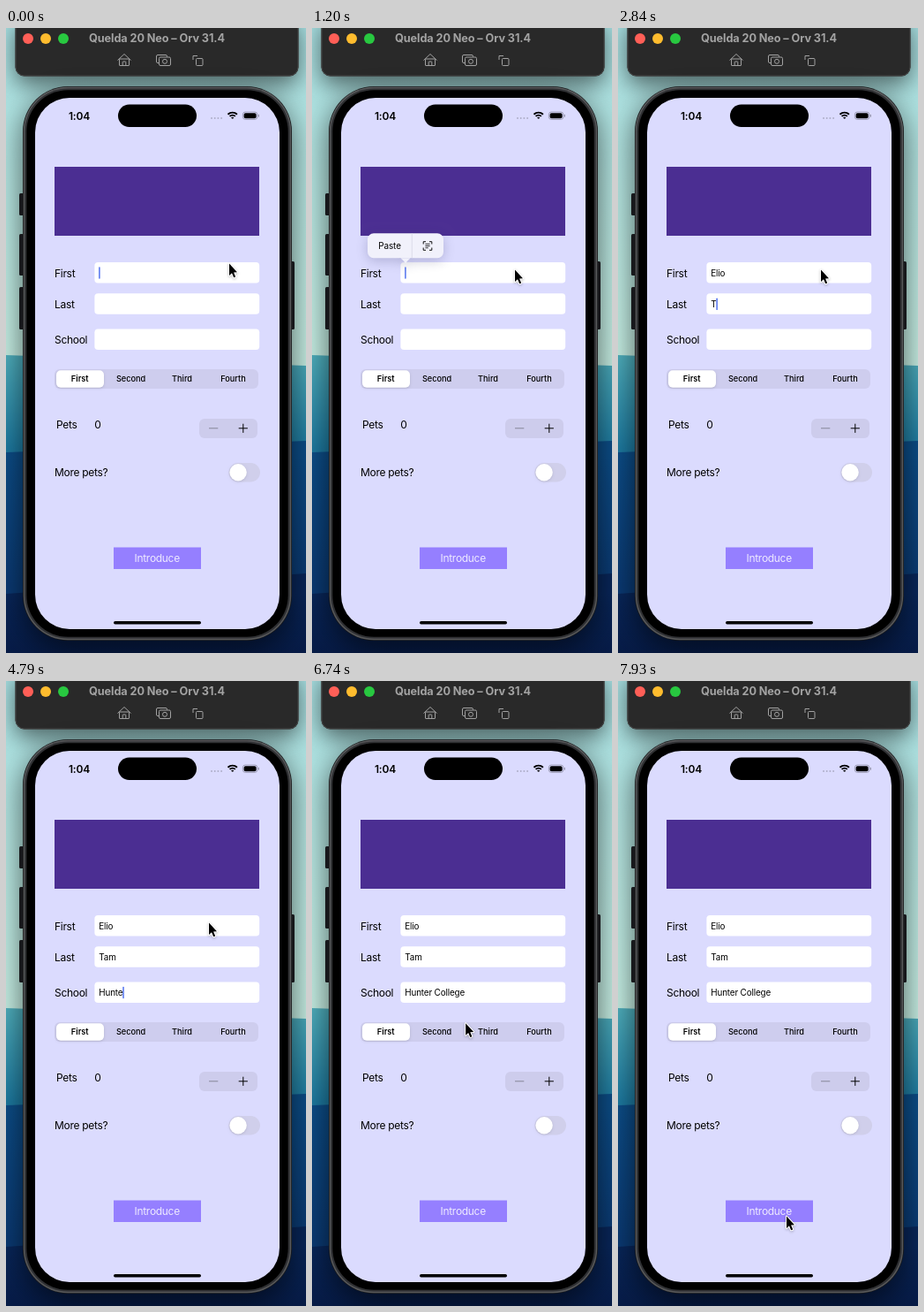
Animation of 340 by 707 pixels, one loop 8000 ms. Source, as an HTML page with a canvas:

```html
<!DOCTYPE html>
<html lang="en">
<head>
<meta charset="utf-8">
<title>Form demo</title>
<style>
  html, body { margin: 0; width: 100%; height: 100%; overflow: hidden; background: #000; }
  canvas { display: block; width: 340px; height: 707px; }
</style>
</head>
<body>
<canvas id="stage"></canvas>
<script>
const W = 340, H = 707, LOOP = 8000;
const FRAME = 149.7;
const PACE = 149.5;    // time per typed letter
const MENU_AT = 1050;

const canvas = document.getElementById('stage');
const ctx = canvas.getContext('2d');
const ratio = window.devicePixelRatio || 1;
canvas.width = W * ratio;
canvas.height = H * ratio;

const fields = [
  { label: 'First', y: 265, value: 'Elio', focusAt: -300, typeAt: 1500 },
  { label: 'Last', y: 300.3, value: 'Tam', focusAt: 2390, typeAt: 2840 },
  { label: 'School', y: 340.5, value: 'Hunter College', focusAt: 3590, typeAt: 4190 }
];
const pointerStops = [
  { t: 0, x: 252, y: 265.5 },
  { t: 450, x: 229, y: 272.5 },
  { t: 6140, x: 229, y: 272.5 },
  { t: 6740, x: 173, y: 386.5 },
  { t: 7480, x: 212, y: 585 },
  { t: 7930, x: 190, y: 604.5 }
];

function box(x, y, w, h, r, fill) {
  ctx.beginPath();
  ctx.roundRect(x, y, w, h, r);
  ctx.fillStyle = fill;
  ctx.fill();
}

function outline(x, y, w, h, r, color, width = 1) {
  ctx.beginPath();
  ctx.roundRect(x, y, w, h, r);
  ctx.strokeStyle = color;
  ctx.lineWidth = width;
  ctx.stroke();
}

function dot(x, y, r, fill) {
  box(x - r, y - r, 2 * r, 2 * r, r, fill);
}

function path(points, close) {
  ctx.beginPath();
  points.forEach(([x, y]) => ctx.lineTo(x, y));
  if (close) ctx.closePath();
}

function line(points, color, width = 1) {
  path(points);
  ctx.strokeStyle = color;
  ctx.lineWidth = width;
  ctx.stroke();
}

function text(str, x, y, { size = 12, weight = 400, color = '#000', align = 'left', track = -0.3 } = {}) {
  ctx.font = `${weight} ${size}px Inter, Roboto, sans-serif`;
  ctx.letterSpacing = track + 'px';
  ctx.textAlign = align;
  ctx.fillStyle = color;
  ctx.fillText(str, x, y);
  return ctx.measureText(str).width;
}

function withShadow(color, blur, dy, draw) {
  ctx.save();
  ctx.shadowColor = color;
  ctx.shadowBlur = blur * ratio;
  ctx.shadowOffsetY = dy * ratio;
  draw();
  ctx.restore();
}

// A layer of the wallpaper, from its slanted top edge down.
function layer(left, right, depth, top, bottom) {
  const g = ctx.createLinearGradient(0, left, 0, left + depth);
  g.addColorStop(0, top);
  g.addColorStop(1, bottom);
  ctx.fillStyle = g;
  path([[0, left], [W, right], [W, H], [0, H]], true);
  ctx.fill();
}

function drawWallpaper() {
  layer(0, 0, 370, '#a6dee0', '#c6efe4');
  layer(370, 382, 105, '#4fb0be', '#1d7ba2');
  layer(480, 467, 150, '#0c4d88', '#0a3a74');
  layer(640, 617, 70, '#08265a', '#061a45');
}

function drawToolbar() {
  withShadow('rgba(0,0,0,.55)', 26, 9, () => box(10.5, -12, 321, 66.5, 10, '#292929'));
  outline(11, -12, 320, 66, 10, '#464646');
  ['#ff5f57', '#febc2e', '#28c840'].forEach((c, i) => dot(25 + 20 * i, 12, 6, c));
  text('Quelda 20 Neo – Orv 31.4', 171, 16, { size: 12.7, weight: 700, color: '#a3a3a3', align: 'center', track: -0.1 });

  const gray = '#a2a2a2';
  ctx.lineJoin = 'round';
  line([[126.5, 36.5], [134, 29.5], [141.5, 36.5]], gray);
  outline(128.5, 35, 11, 7.5, 0.5, gray);
  outline(132.2, 38, 3.6, 4.5, 0.5, gray);
  outline(170.5, 30.5, 12, 9, 1.5, gray);
  box(173, 32.5, 14, 10.5, 1.5, '#292929');
  outline(173.5, 33, 13, 9.5, 1.5, gray);
  outline(177.5, 35.3, 5, 5, 2.5, gray);
  outline(215.5, 34.5, 7.5, 8, 1, gray);
  line([[212, 36], [212, 31.5], [217, 31.5]], gray);
}

function drawPhone() {
  const button = (x, y, h) => box(x, y, 5, h, 1.5, '#202126');
  button(15, 187, 25);
  button(15, 233, 47);
  button(15, 293, 48);
  button(322, 264, 77);
  withShadow('rgba(0,0,0,.6)', 34, 10, () => box(19, 66, 305, 627, 51, '#17181a'));
  box(19.8, 66.8, 303.4, 625.4, 50, '#58595b');
  box(21.2, 68.2, 300.6, 622.6, 49, '#303134');
  box(23.3, 70.2, 296.4, 618.6, 47, '#000');
  box(33, 79, 277, 601, 39, '#dbdbfe');
  box(127, 86.5, 89, 25.5, 12.75, '#000');
  box(122, 671, 99, 3.4, 1.7, '#000');
}

function drawStatus() {
  text('1:04', 71, 103.5, { weight: 600, track: -0.2 });
  for (let i = 0; i < 4; i++) dot(233 + 3.7 * i, 102, 1, '#aeaec9');
  for (const r of [1.4, 4.4, 7.4]) {
    ctx.beginPath();
    ctx.arc(256.7, 103, r, -Math.PI * 0.75, -Math.PI * 0.25);
    ctx.strokeStyle = '#000';
    ctx.lineWidth = 1.9;
    ctx.stroke();
  }
  outline(268.4, 95, 16.4, 8.4, 2.8, '#8e8ea5', 0.8);
  box(269.6, 96.2, 14, 6, 1.8, '#000');
  box(285.8, 97.7, 1, 3, 0.5, '#8e8ea5');
}

function drawControls() {
  box(55, 157, 232, 78, 0, '#4b2e92');

  box(55, 386, 231, 22, 6, '#cecdee');
  withShadow('rgba(0,0,0,.14)', 3, 1, () => box(57, 387.3, 54, 19.4, 5, '#fff'));
  ['First', 'Second', 'Third', 'Fourth'].forEach((name, i) =>
    text(name, 83.7 + 57.9 * i, 400.4, { size: 9.2, weight: i ? 500 : 600, align: 'center', track: 0 }));

  text('Pets', 57, 453.4);
  text('0', 100.3, 453.4);
  box(219, 442, 66, 22, 6, '#cdccec');
  line([[230, 452.8], [240.3, 452.8]], '#858598');
  line([[263.7, 452.8], [273.9, 452.8]], '#000');
  line([[268.8, 447.7], [268.8, 457.9]], '#000');

  text('More pets?', 55, 507.2);
  box(252.3, 492, 35.7, 21.5, 10.75, '#d0cfeb');
  withShadow('rgba(0,0,0,.12)', 3, 1, () => dot(263.1, 502.75, 9.7, '#fff'));

  box(122, 587.5, 99, 24.5, 0, '#957fff');
  text('Introduce', 171.2, 604.4, { color: '#eeeaff', align: 'center' });
}

function lettersTyped({ value, typeAt }, t) {
  const count = Math.floor((t - typeAt) / PACE) + 1;
  return Math.max(0, Math.min(value.length, count));
}

// The caret stays lit after each action, then blinks.
function caretVisible(field, count, t) {
  let last = field.focusAt;
  if (count) last = field.typeAt + (count - 1) * PACE;
  else if (field === fields[0] && t >= MENU_AT) last = MENU_AT;
  return (t - last - 150) % 900 < 450;
}

function drawFields(t) {
  const focused = fields.filter(f => f.focusAt <= t).pop();
  for (const field of fields) {
    const { label, y, value } = field;
    const count = lettersTyped(field, t);
    text(label, 55, y + 16.8);
    box(100.4, y, 186.8, 23.5, 3.8, '#fff');
    const width = text(value.slice(0, count), 105.3, y + 15.6, { size: 9.87, track: -0.15 });
    if (field === focused && caretVisible(field, count, t)) {
      box(105.2 + width, y + 5.2, 1.4, 13.6, 0.7, '#4568ee');
    }
  }
}

function drawMenu(t) {
  const fade = Math.min((t - MENU_AT + 200) / 300, (1500 - t) / 250, 1);
  if (t < MENU_AT || fade <= 0) return;
  ctx.save();
  ctx.globalAlpha = fade;
  withShadow('rgba(40,40,90,.25)', 14, 3, () => {
    ctx.beginPath();
    ctx.roundRect(63, 232.3, 86, 28, 7);
    ctx.moveTo(99, 260);
    ctx.quadraticCurveTo(102, 260.5, 106, 266.5);
    ctx.quadraticCurveTo(110, 260.5, 113, 260);
    ctx.fillStyle = '#f1f1fb';
    ctx.fill();
  });
  box(112.8, 232.3, 0.8, 28, 0, '#d7d7e6');
  text('Paste', 88, 249.8, { size: 9.87, align: 'center', track: -0.05 });
  ctx.translate(131, 246.5);
  for (let i = 0; i < 4; i++) {
    line([[-4.8, -2], [-4.8, -4.8], [-2, -4.8]], '#111');
    ctx.rotate(Math.PI / 2);
  }
  for (const y of [-2.2, 0, 2.2]) line([[-2.6, y], [y > 0 ? 0.8 : 2.6, y]], '#111', 0.9);
  ctx.restore();
}

function pointerAt(t) {
  const i = pointerStops.findIndex(stop => stop.t > t);
  if (i < 0) return pointerStops[pointerStops.length - 1];
  const a = pointerStops[i - 1], b = pointerStops[i];
  const k = (t - a.t) / (b.t - a.t);
  const eased = k * (3 - k) / 2;
  return { x: a.x + (b.x - a.x) * eased, y: a.y + (b.y - a.y) * eased };
}

function drawPointer(t) {
  const { x, y } = pointerAt(Math.floor((t + 12) / FRAME) * FRAME);
  ctx.save();
  ctx.translate(x, y);
  path([[1, 1], [1, 14.6], [4, 11.8], [6.2, 16.8], [8.2, 16], [6.1, 11], [10, 10.8]], true);
  ctx.lineJoin = 'round';
  withShadow('rgba(0,0,0,.25)', 3, 1, () => {
    ctx.strokeStyle = '#fff';
    ctx.lineWidth = 2;
    ctx.stroke();
  });
  ctx.fillStyle = '#000';
  ctx.fill();
  ctx.restore();
}

function render(t) {
  ctx.setTransform(ratio, 0, 0, ratio, 0, 0);
  drawWallpaper();
  drawToolbar();
  drawPhone();
  drawStatus();
  drawControls();
  drawFields(t + 6);
  drawMenu(t + 6);
  drawPointer(t);
}

const start = performance.now();
function tick() {
  render((performance.now() - start) % LOOP);
  requestAnimationFrame(tick);
}
tick();
</script>
</body>
</html>
```
